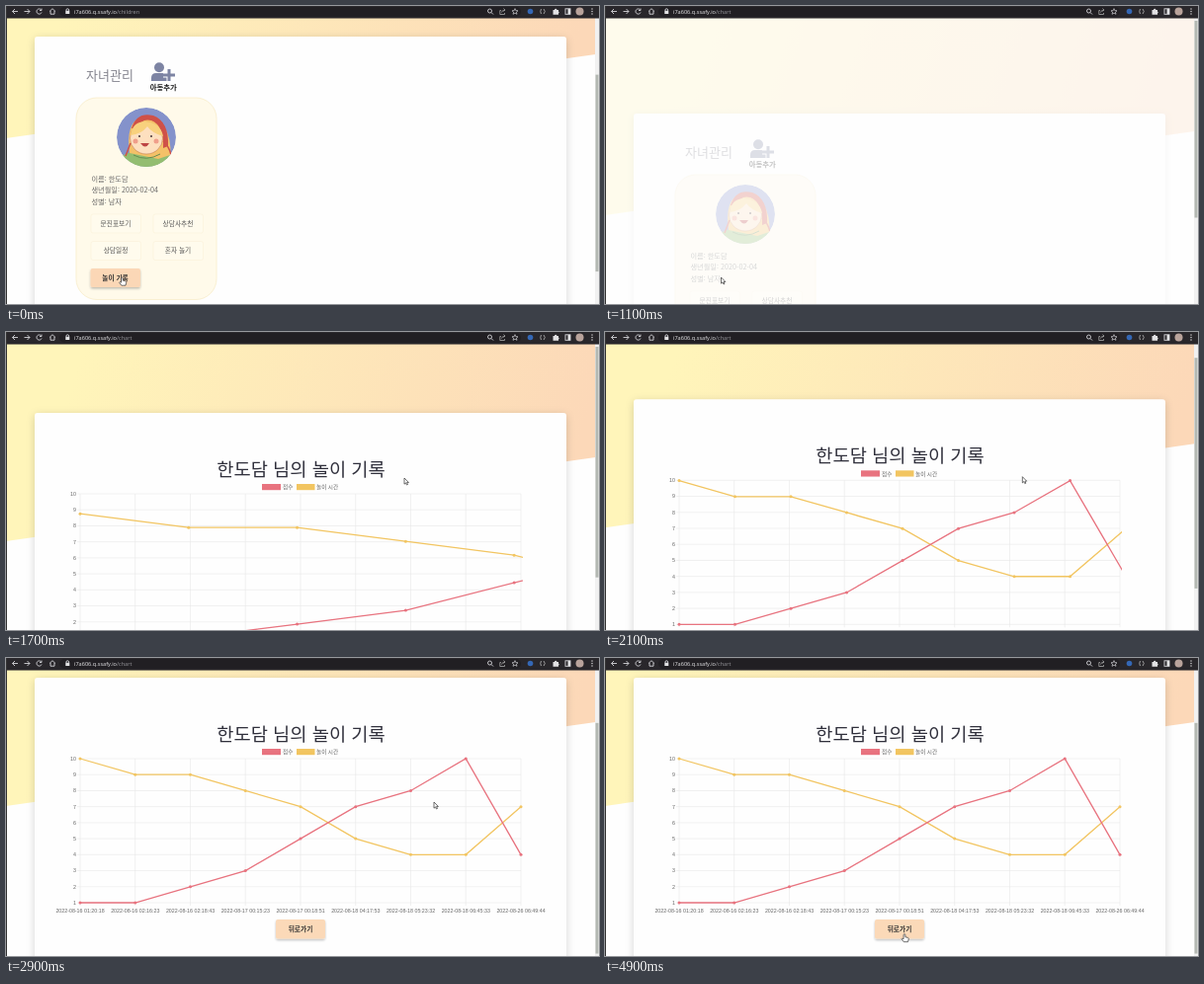
These frames come from a looping animation (600x302 px, 5000 ms). An HTML page:

```html
<!DOCTYPE html>
<html lang="ko">
<head>
<meta charset="utf-8">
<style>
html, body { margin: 0; width: 100%; height: 100%; overflow: hidden; background: #fefefe; }
svg { display: block; width: 600px; height: 302px; font-family: "Noto Sans CJK KR", "Noto Sans CJK", sans-serif; }
.mid { text-anchor: middle; }
.axis { font: 5.3px "Liberation Sans", Arial, sans-serif; fill: #666; }
.url { font: 5.6px "Open Sans", "Noto Sans", sans-serif; fill: #e8e8ea; }
.line { fill: none; stroke-width: 1.3; }
.icon { fill: none; stroke: #d4d4d8; stroke-width: .9; }
</style>
</head>
<body>
<svg viewBox="0 0 600 302">
  <defs>
    <linearGradient id="warm" gradientUnits="userSpaceOnUse" x1="70" y1="40" x2="550" y2="200">
      <stop offset="0" stop-color="#fff5ba"/>
      <stop offset="1" stop-color="#fcd8b8"/>
    </linearGradient>
    <filter id="cardShadow" x="-5%" y="-5%" width="110%" height="110%">
      <feDropShadow dx="0" dy="2" stdDeviation="4" flood-opacity=".16"/>
    </filter>
    <filter id="buttonShadow" x="-20%" y="-30%" width="140%" height="180%">
      <feDropShadow dx="0" dy="1.5" stdDeviation="1.3" flood-opacity=".25"/>
    </filter>
    <clipPath id="face"><circle cx="142" cy="133" r="30"/></clipPath>
    <clipPath id="plot"><rect x="73" y="90" width="450" height="165"/></clipPath>
  </defs>

  <g id="page">
    <path d="M0-100H600V126.5L0 212Z" fill="url(#warm)"/>
    <rect id="card" x="29" width="538" height="420" rx="3" fill="#fefefe" filter="url(#cardShadow)"/>

    <g id="children" transform="translate(0 78)">
      <text x="81" y="74.5" font-size="13" font-weight="500" fill="#85858f">자녀관리</text>
      <g fill="#7d84a3">
        <circle cx="155" cy="62.3" r="5"/>
        <path d="M147 76v-3q0-5 5-5h6q5 0 5 5v3z"/>
        <path d="M159 70h12M165 64v12" stroke="#fff" stroke-width="5"/>
        <path d="M159 70h12M165 64v12" stroke="#7d84a3" stroke-width="3"/>
      </g>
      <text class="mid" x="159.3" y="84.5" font-size="7.4" font-weight="700" fill="#222">아동추가</text>
      <rect x="71" y="93" width="142" height="204.500" rx="21" fill="#fffaea" stroke="#faf0d2"/>
      <g clip-path="url(#face)">
        <circle cx="142" cy="133" r="30" fill="#8492cb"/>
        <path d="M110 166q4-19 22-18l22-1q16 1 20 19z" fill="#93bd70"/>
        <path d="M125 149q-4-30 11-36 17-6 24 9 8 14 6 29l-12 4z" fill="#f4c168"/>
        <path d="M127 124q5-17 22-13 16 6 15 31l-5 2q1-23-12-28-10-3-15 9z" fill="#cf5148"/>
        <ellipse cx="142" cy="134" rx="16.500" ry="16" fill="#fddfbf" stroke="#b66f4c" stroke-width=".5"/>
        <path d="M126 131q2-14 15-14 15 1 18 15-11-3-16-10-6 8-17 9z" fill="#f8d17d"/>
        <path d="M126 139q-3 8-5 13M159 137q6 5 8 14" stroke="#cf5148" stroke-width="1.500" fill="none"/>
        <g fill="#443338"><circle cx="135" cy="132" r="1"/><circle cx="147" cy="132" r="1"/></g>
        <g fill="#f09e8b"><circle cx="131" cy="137" r="2.500"/><circle cx="152" cy="137" r="2.500"/></g>
        <path d="M136 139q5 7 9 0z" fill="#bd4444"/>
        <path d="M129 151q13 7 27-1" stroke="#658e51" fill="none"/>
      </g>
      <g font-size="7.200" fill="#686868">
        <text x="86.500" y="177.500">이름: 한도담</text>
        <text x="86.500" y="189">생년월일: 2020-02-04</text>
        <text x="86.500" y="200.500">성별: 남자</text>
      </g>
      <g id="actions"></g>
    </g>

    <g id="record" transform="translate(0 62)">
      <text class="mid" x="298.500" y="83.500" font-size="18.700" font-weight="300" fill="#30303c">한도담 님의 놀이 기록</text>
      <rect x="259" y="92" width="19" height="6.200" fill="#e8737f"/>
      <rect x="294" y="92" width="18.500" height="6.200" fill="#f2c561"/>
      <g font-size="5.600" fill="#666">
        <text x="280" y="97.200">점수</text>
        <text x="314" y="97.200">놀이 시간</text>
      </g>
      <g id="axes"></g>
      <g id="series" clip-path="url(#plot)"></g>
      <rect x="273" y="265" width="50" height="19.500" rx="2" fill="#fbd9b8" filter="url(#buttonShadow)"/>
      <text class="mid" x="298" y="276.800" font-size="6.700" font-weight="700" fill="#333">뒤로가기</text>
    </g>
  </g>

  <rect x="596" y="12" width="4" height="290" fill="#f1f1f1"/>
  <rect id="thumb" x="596.500" width="3" fill="#b3b8b2"/>

  <rect width="600" height="12.500" fill="#29272b"/>
  <rect width="1" height="302" fill="#333"/>
  <rect x="54" y="1" width="467" height="9.500" rx="4.700" fill="#211f23"/>
  <g class="icon">
    <path d="M12 5.500H6.500M9 3L6.500 5.500 9 8M18.500 5.500H24M21.500 3L24 5.500 21.500 8"/>
    <path d="M35.700 4A2.600 2.600 0 1 0 36 6.500M36 2.500V4.500H34"/>
    <path d="M44 5.500L47 2.700 50 5.500M45 5V8.200H49V5"/>
    <path d="M61 5V4a1.300 1.300 0 0 1 2.600 0V5"/>
    <circle cx="489.500" cy="5" r="2"/><path d="M491 6.500L493 8.500"/>
    <path d="M501 4.500H499.800V8.500H504.500V7M501.500 6.500Q502 4 505 4M503.500 2.500L505 4 503.500 5.500" stroke="#999"/>
    <path d="M515 2.600L515.800 4.600 518 4.800 516.400 6.200 517 8.300 515 7.100 513 8.300 513.600 6.200 512 4.800 514.200 4.600Z" stroke-width=".7"/>
    <path d="M541.500 3Q540 5.500 541.500 8M544 3Q546.500 5.500 544 8" stroke="#aaa"/>
    <rect x="566" y="2.800" width="5" height="5.500"/>
  </g>
  <g fill="#e2e2e4">
    <rect x="60.300" y="4.800" width="4" height="3.200"/>
    <path d="M553.500 4H555a1.200 1.200 0 0 1 2.400 0H559V5.500a1.200 1.200 0 0 1 0 2V8.800H553.500Z"/>
    <path d="M568.500 2.800H571V8.300H568.500Z"/>
    <circle cx="593" cy="3" r=".7"/><circle cx="593" cy="5.500" r=".7"/><circle cx="593" cy="8" r=".7"/>
  </g>
  <circle cx="530.500" cy="5.500" r="2.800" fill="#3467b5"/>
  <circle cx="580.500" cy="5.500" r="4" fill="#b9a39b"/>
  <text class="url" x="69" y="7.700">i7a606.q.ssafy.io<tspan id="path" fill="#97979c"></tspan></text>

  <g id="cursor" stroke="#333" stroke-width=".7" stroke-linejoin="round" fill="#fff">
    <path id="arrow" d="M0 0V6.200L1.500 4.900 2.500 7 3.500 6.500 2.600 4.500H4.400Z"/>
    <path id="hand" d="M-.9 .8Q0-.5 .9 .8V3.300L3.500 3.900Q4.400 4.200 4.200 5.300L3.500 8.200H-.7L-2.900 5.200Q-2.700 4-.9 5.200Z"/>
  </g>
</svg>
<script>
const LOOP = 5000, STEP = 100, ROUTE = 800, SWAP = 1200, CHART_START = 1310;
const LEFT = 75, WIDTH = 446, BASE = 248, UNIT = 146 / 9;
const byId = id => document.getElementById(id);
const clamp = v => Math.min(1, Math.max(0, v));
const rowY = value => BASE - (value - 1) * UNIT;

const stamps = ["16 01:20:18", "16 02:16:23", "16 02:18:43", "17 00:15:23", "17 00:18:51",
  "18 04:17:53", "18 05:23:32", "18 06:45:33", "26 06:49:44"];
const series = [
  { color: "#f2c561", values: [10, 9, 9, 8, 7, 5, 4, 4, 7] },
  { color: "#e8737f", values: [1, 1, 2, 3, 5, 7, 8, 10, 4] }
];
const gap = WIDTH / (stamps.length - 1);

// Keyframes: time followed by the values to interpolate
const scrollKeys = [[2000, 0], [2300, 41], [2500, 62]];
const cursorKeys = [[0, 117.5, 275], [1150, 117.5, 275], [1700, 403, 148], [2300, 432, 146],
  [2900, 433, 146], [3700, 433, 146], [3900, 432, 150], [4350, 368, 215], [4800, 303, 279.5]];

function track(keys, t) {
  const next = keys.findIndex(k => k[0] > t);
  if (next === 0) return keys[0].slice(1);
  if (next < 0) return keys[keys.length - 1].slice(1);
  const a = keys[next - 1], b = keys[next], f = (t - a[0]) / (b[0] - a[0]);
  return a.slice(1).map((v, i) => v + (b[i + 1] - v) * f);
}

function buildActions() {
  const button = (label, x, y, active) => `
    <rect x="${x - 25}" y="${y - 9.5}" width="50.5" height="19" rx="2"
      ${active ? 'fill="#fbd7b6" filter="url(#buttonShadow)"' : 'fill="#fffbed" stroke="#fbf3dc" stroke-width=".7"'}/>
    <text class="mid" x="${x}" y="${y + 2.2}" font-size="6.7"
      font-weight="${active ? 700 : 500}" fill="${active ? "#333" : "#555"}">${label}</text>`;
  byId("actions").innerHTML = button("문진표보기", 111, 220.5) + button("상담사추천", 174, 220.5) +
    button("상담일정", 111, 248) + button("혼자 놀기", 174, 248) + button("놀이 기록", 110.5, 275.5, true);
}

function buildAxes() {
  let out = "";
  for (let v = 1; v <= 10; v++) {
    out += `<path d="M72 ${rowY(v)}H521" stroke="#e7e7e7" stroke-width=".6"/>
      <text class="axis" x="71" y="${rowY(v) + 1.9}" text-anchor="end">${v}</text>`;
  }
  stamps.forEach((stamp, i) => {
    const x = LEFT + i * gap;
    out += `<path d="M${x} 102V251" stroke="#e7e7e7" stroke-width=".6"/>
      <text class="axis mid" x="${x}" y="257.5">2022-08-${stamp}</text>`;
  });
  byId("axes").innerHTML = out;
}

function drawSeries(t) {
  const p = 1 - (1 - clamp((t - CHART_START) / 1000)) ** 4;
  const spacing = WIDTH + (gap - WIDTH) * p;
  byId("series").innerHTML = series.map(({ color, values }) => {
    const points = values.map((v, i) => [LEFT + i * spacing, rowY(1 + (v - 1) * p)]);
    return `<polyline class="line" stroke="${color}" points="${points.join(" ")}"/>` +
      points.map(([x, y]) => `<circle cx="${x}" cy="${y}" r="1.5" fill="${color}"/>`).join("");
  }).join("");
}

const show = (id, on) => byId(id).style.display = on ? "" : "none";

function render(t) {
  const onRecord = t >= SWAP;
  const scroll = t < ROUTE ? 78 : track(scrollKeys, t)[0];
  const opacity = onRecord ? clamp((t - SWAP) / 350) : 1 - clamp((t - ROUTE) / (SWAP - ROUTE));
  byId("page").setAttribute("transform", `translate(0 ${-scroll})`);
  byId("page").setAttribute("opacity", opacity);
  byId("card").setAttribute("y", onRecord ? 82 : 109);
  show("children", !onRecord);
  show("record", onRecord);
  if (onRecord) drawSeries(t);

  const ratio = onRecord ? 0.82 : 0.7;
  byId("thumb").setAttribute("y", 15 + scroll * ratio);
  byId("thumb").setAttribute("height", 285 * ratio);
  byId("path").textContent = t < ROUTE ? "/children" : "/chart";

  const pointing = t < ROUTE || t >= 4700;
  byId("cursor").setAttribute("transform", `translate(${track(cursorKeys, t)})`);
  show("hand", pointing);
  show("arrow", !pointing);
}

buildActions();
buildAxes();
const start = performance.now();
function tick() {
  const elapsed = (performance.now() - start) % LOOP;
  render(Math.floor(elapsed / STEP) * STEP);
  requestAnimationFrame(tick);
}
tick();
</script>
</body>
</html>
```
